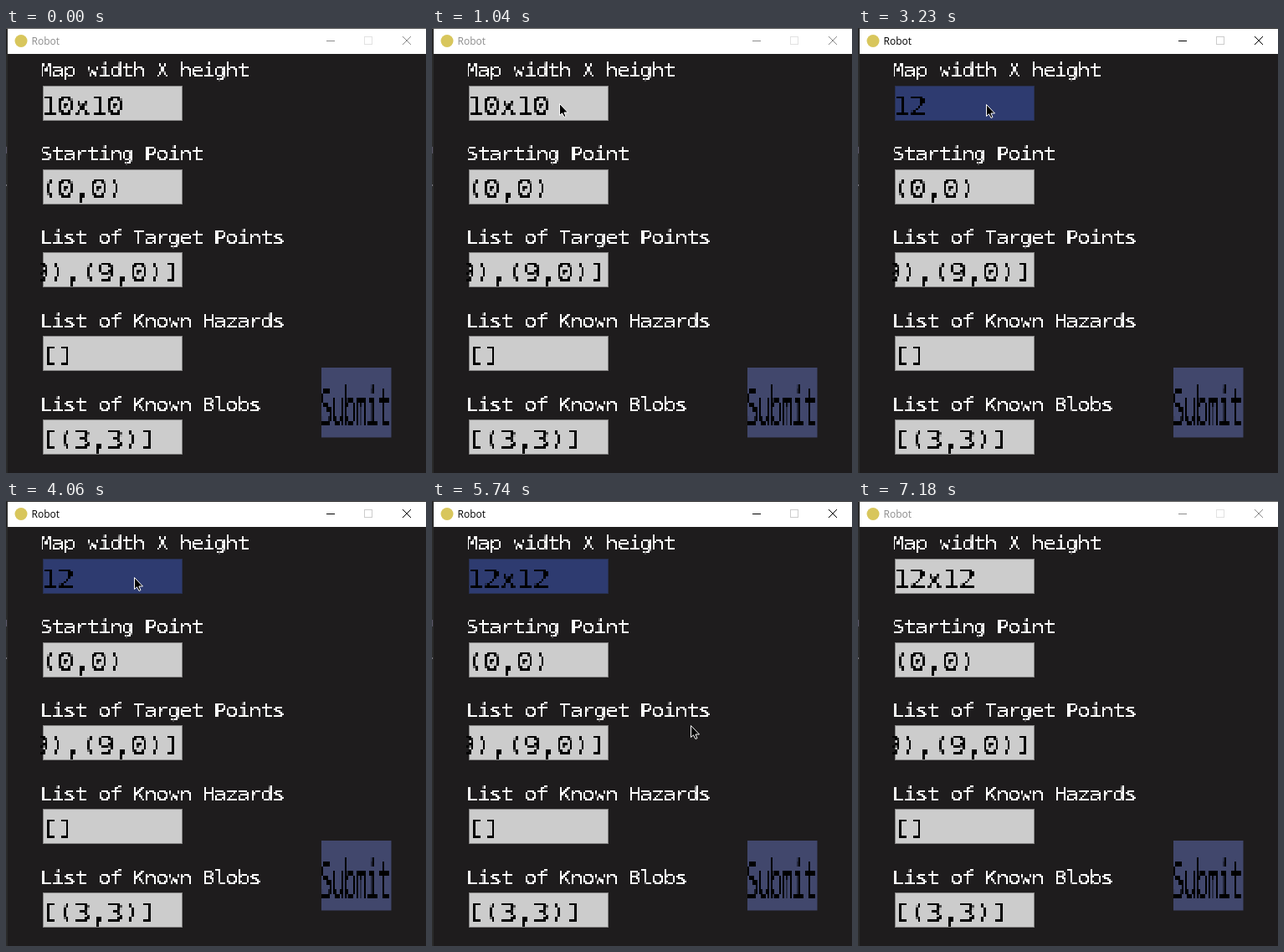
Animation of 502x532 px, one loop 7220 ms. Source, as an HTML page with a canvas:

```html
<!DOCTYPE html>
<html lang="en">
<head>
<meta charset="utf-8">
<title>Robot</title>
<style>
  html, body { margin: 0; width: 100%; height: 100%; overflow: hidden; background: #1e1c1d; }
  canvas { display: block; }
</style>
</head>
<body>
<canvas id="stage" width="502" height="532"></canvas>
<script>
const LOOP = 7220;
const ctx = document.getElementById('stage').getContext('2d');

const FIELDS = [
  ['Map width X height', ''],
  ['Starting Point', '(0,0)'],
  ['List of Target Points', '9),(9,0)]'],
  ['List of Known Hazards', '[]'],
  ['List of Known Blobs', '[(3,3)]']
];

// What the first field holds from each time on
const TYPING = [
  [0, '10x10'], [2200, '10x1'], [2440, '10x'], [2620, '10'], [2860, '1'],
  [3230, '12'], [3510, '12,'], [4060, '12'], [4490, '12x'], [4810, '12x1'], [4860, '12x12']
];

// Pointer: start, duration, tick, easing power, from, to
const MOVES = [
  { at: 540, dur: 500, tick: 45, pow: 2, from: [462, 524], to: [152, 90] },
  { at: 1640, dur: 1, tick: 1, pow: 1, from: [152, 90], to: [153, 91] },
  { at: 5470, dur: 555, tick: 45, pow: 2.2, from: [153, 91], to: [338, 301] }
];
const EXIT = [[6380, 350, 322], [6420, 386, 384], [6475, 425, 455], [6520, 450, 512]];

const latest = (steps, t) => steps.filter(s => s[0] <= t).pop();

function makeCanvas(w, h) {
  const c = document.createElement('canvas');
  c.width = w;
  c.height = h;
  return c;
}

// Sets type on a coarse grid: each letter is 6 cells wide with a 7 cell advance,
// capitals are 8 cells high and the baseline lies under row 9 of 12.
const Q = 9;
const cache = {};
function gridText(str, color) {
  const key = color + str;
  if (cache[key]) return cache[key];
  const cols = str.length * 7, rows = 12;
  const big = makeCanvas(cols * Q, rows * Q);
  const g = big.getContext('2d');
  g.font = `${11 * Q}px "DejaVu Sans Mono", monospace`;
  g.textAlign = 'center';
  g.fillStyle = color;
  [...str].forEach((ch, i) => {
    const m = g.measureText(ch);
    const sx = Math.min(1.2, 6 * Q / (m.actualBoundingBoxLeft + m.actualBoundingBoxRight));
    let sy = 1, drop = 0;
    if ('()[]'.includes(ch)) {
      sy = 8 * Q / (m.actualBoundingBoxAscent + m.actualBoundingBoxDescent);
      drop = -m.actualBoundingBoxDescent * sy;
    }
    for (const dy of [-0.07, 0.07]) {
      g.setTransform(sx, 0, 0, sy, (7 * i + 2.88) * Q, (9 + dy) * Q + drop);
      g.fillText(ch, 0, 0);
    }
  });
  // Thin the stems so that each falls into a single column
  g.resetTransform();
  g.globalCompositeOperation = 'destination-in';
  g.drawImage(big, 1, 0);

  const small = makeCanvas(cols, rows);
  const s = small.getContext('2d');
  s.imageSmoothingEnabled = false;
  s.drawImage(big, 0, 0, cols, rows);
  return cache[key] = small;
}

function drawText(str, x, base, cw, ch, color) {
  const img = gridText(str, color);
  ctx.imageSmoothingEnabled = false;
  ctx.drawImage(img, x, base - 9 * ch, img.width * cw, img.height * ch);
}

function rect(x, y, w, h, color) {
  ctx.fillStyle = color;
  ctx.fillRect(x, y, w, h);
}

function line(color, ...pts) {
  ctx.strokeStyle = color;
  ctx.lineWidth = 1;
  ctx.beginPath();
  pts.forEach(([x, y], i) => i ? ctx.lineTo(x, y) : ctx.moveTo(x, y));
  ctx.stroke();
}

function drawTitleBar(focused) {
  const ink = focused ? '#000' : '#8c8c8c';
  rect(0, 0, 2, 532, '#2a2a2a');
  rect(0, 142, 1, 8, '#5a5768');
  rect(0, 187, 1, 2, '#77757d');
  rect(2, 0, 500, 31, '#fff');
  rect(0, 0, 502, 1, focused ? '#2b2b2b' : '#555');
  ctx.fillStyle = '#d8c65c';
  ctx.beginPath();
  ctx.arc(18, 15.5, 7.5, 0, 7);
  ctx.fill();
  ctx.fillStyle = ink;
  ctx.font = '12px "Open Sans", sans-serif';
  ctx.fillText('Robot', 30.5, 20);
  line(ink, [383, 15.5], [393, 15.5]);
  ctx.strokeStyle = focused ? '#ccc' : '#e2e2e2';
  ctx.strokeRect(428.5, 10.5, 9, 9);
  line(ink, [474, 10], [484, 20]);
  line(ink, [484, 10], [474, 20]);
}

function drawField([label, value], i, active) {
  const y = 69 + 100 * i - (i > 1 ? 1 : 0);
  drawText(label, 42.5, 58 + 100 * i, 1.98, 2, '#fff');
  // The box ends between pixels, which leaves a soft rim
  rect(44, y, 167, 42, active ? '#283051' : '#868585');
  rect(45, y + 1, 165, 40, active ? '#2e3b70' : '#cccccc');
  ctx.save();
  ctx.beginPath();
  ctx.rect(41, y, 170, 42);
  ctx.clip();
  drawText(value, value.length > 8 ? 32.5 : 43.5, 104 + 100 * i - (i ? 1 : 0), 2.81, 2.8, '#000');
  ctx.restore();
}

function pointerAt(t) {
  if (t < 540 || t >= 6570) return null;
  if (t >= 6380) return latest(EXIT, t).slice(1);
  const m = MOVES.filter(m => m.at <= t).pop();
  const ticks = Math.floor((t - m.at) / m.tick) + 1;
  const u = Math.min(1, ticks * m.tick / m.dur);
  const e = 1 - (1 - u) ** m.pow;
  return m.from.map((a, k) => Math.round(a + (m.to[k] - a) * e));
}

const ARROW = new Path2D('M0 0V14L3 11.3L5.5 16L7.5 15L5.4 10.5H10Z');
function drawPointer([x, y]) {
  ctx.save();
  ctx.translate(x + 0.5, y + 0.5);
  ctx.fillStyle = '#000';
  ctx.strokeStyle = '#fff';
  ctx.lineWidth = 1;
  ctx.fill(ARROW);
  ctx.stroke(ARROW);
  ctx.restore();
}

function draw(t) {
  const active = t >= 1420 && t < 6100;
  rect(0, 0, 502, 532, '#1e1c1d');
  drawTitleBar(t >= 1320 && t < 7180);
  FIELDS[0][1] = latest(TYPING, t)[1];
  FIELDS.forEach((f, i) => drawField(f, i, active && i === 0));
  rect(377, 406, 83.5, 83.5, '#41476c');
  drawText('Submit', 377, 475, 1.98, 5.5, '#000');
  const tip = pointerAt(t);
  if (tip) drawPointer(tip);
}

const start = performance.now();
function tick() {
  draw((performance.now() - start) % LOOP);
  requestAnimationFrame(tick);
}
tick();
</script>
</body>
</html>
```
